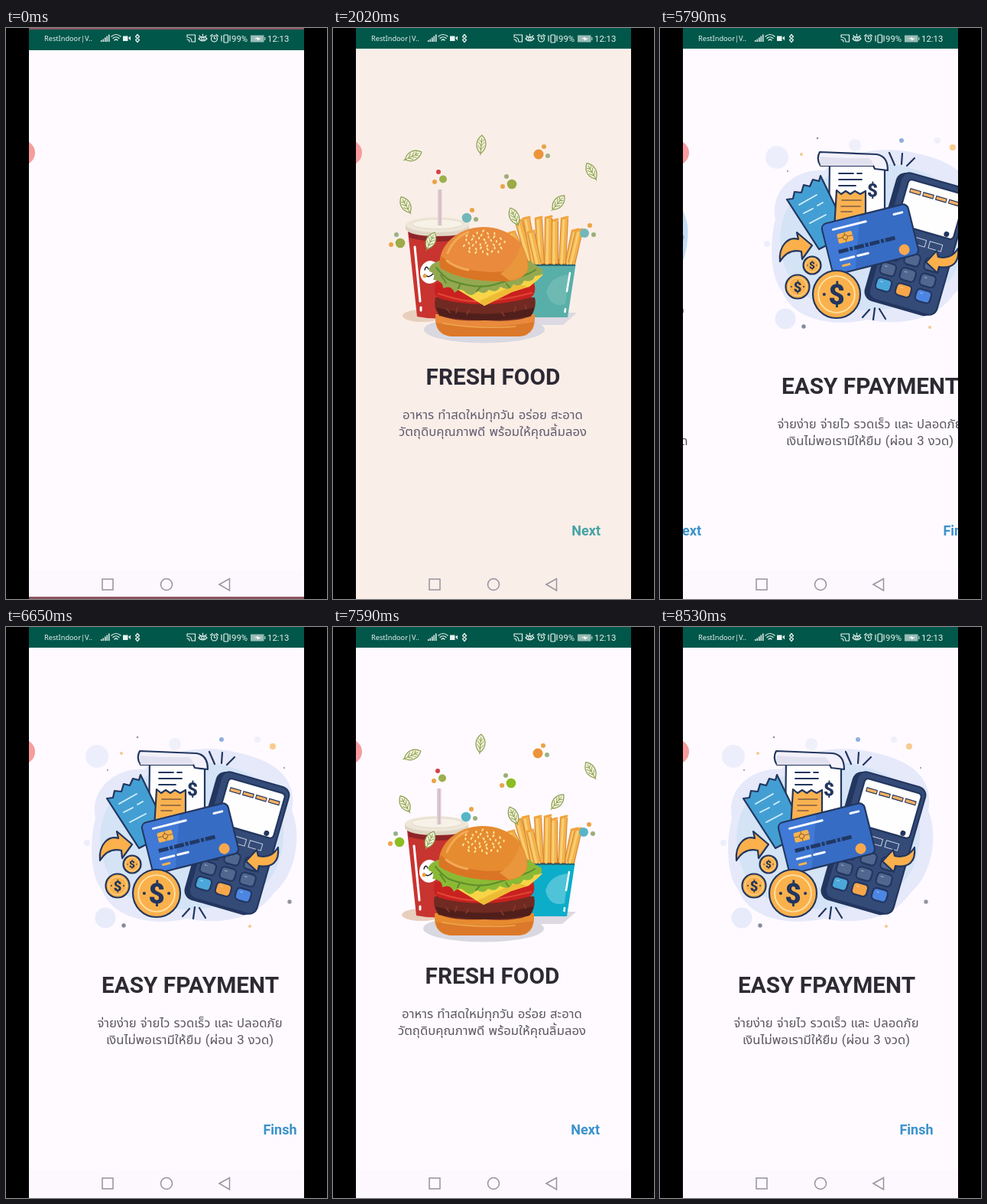
Animation, 420 px wide and 746 px high, one loop 8.61 s. Source, as an HTML page:

```html
<!DOCTYPE html>
<html lang="th">
<head>
<meta charset="utf-8">
<title>Onboarding</title>
<style>
html, body { margin: 0; width: 100%; height: 100%; overflow: hidden; background: #000; }
svg { display: block; width: 420px; height: 746px; }
#stage {
  --bg: #fefaff; --nav: #fcf8fd; --next: #3a92cc; --title: #2d2a32; --copy: #5a575e;
  --cup: #0cadc9; --cupLight: #4fc4d8; --lime: #8cbd22; --sky: #c5ddf5; --city: #e8f1fc;
  --virus: #5b82d8; --jeans: #3f70cc; --jeansDark: #2c559f; --body: #fab52e; --pale: #fdd165;
  --box: #f7a51f; --bun: #e68b2f; --shirt: #84ba8c; --lettuce: #8aba35; --dot: #57b5c8;
}
#stage.warm {
  --bg: #faeee8; --nav: #faeee8; --next: #45a3a4; --title: #2c2935; --copy: #605c70;
  --cup: #58afa9; --cupLight: #6ebab3; --lime: #9caa47; --sky: #c9e5e2; --city: #e5edf0;
  --virus: #4a8387; --jeans: #3c7275; --jeansDark: #2b565c; --body: #f3b34b; --pale: #f6ca74;
  --box: #eea344; --bun: #e98a3c; --shirt: #74aa93; --lettuce: #93a850; --dot: #72b7bb;
}
text { font-family: Roboto, "Noto Sans Thai Looped", "Noto Sans", "Noto Sans Thai", sans-serif; }
.title { font-size: 29.8px; font-weight: 700; fill: var(--title); text-anchor: middle; }
.copy { font-size: 16.7px; word-spacing: 1px; fill: var(--copy); text-anchor: middle; }
.next { font-size: 18px; font-weight: 700; fill: var(--next); text-anchor: end; }
.status { fill: #e9f3f0; font-size: 11.4px; }
.carrier { font: 9.2px "Noto Sans", sans-serif; }
.line { fill: none; stroke-linecap: round; stroke-linejoin: round; }
.ink { stroke: #22365f; stroke-width: 2.2; stroke-linejoin: round; }
.cash { fill: #22365f; font-weight: 900; text-anchor: middle; }
</style>
</head>
<body>
<svg id="stage" viewBox="0 0 420 746">
<defs>
  <clipPath id="screen"><rect x="30" width="360" height="746"/></clipPath>
  <g id="leaf" class="line" stroke="#8b9d4c" stroke-width="1.2">
    <path d="M0-12C8-5 8 5 0 12C-8 5-8-5 0-12Z" fill="#f1f2dc"/>
    <path d="M0-8V14M0 7L4 2M0 7L-4 2M0 2L4-3M0 2L-4-3M0-3L3-6M0-3L-3-6" stroke-width=".9"/>
  </g>
  <g id="virus" fill="none" stroke="var(--virus)">
    <circle r="5" fill="var(--virus)"/>
    <circle r="7.5" stroke-width="4" stroke-dasharray="1.5 4.39"/>
    <circle r="9" stroke-width="1.8" stroke-dasharray="3 4.07" stroke-dashoffset=".8"/>
  </g>
</defs>

<rect width="420" height="746"/>
<g clip-path="url(#screen)">
<rect x="30" width="360" height="746" fill="var(--bg)"/>
<g id="pages">

<g id="food"><g transform="translate(1)">
  <ellipse cx="116" cy="376" rx="26" ry="8" fill="#e8cfbd"/>
  <path d="M262 372H318L300 388H262Z" fill="#dcd9e2"/>
  <ellipse cx="197" cy="394" rx="79" ry="17.500" fill="#d9d8e1"/>
  <path d="M97 266H175L162 377Q136 382 109 377Z" fill="#c83430"/>
  <path d="M152 268H175L162 377Q156 379 148 379Z" fill="#a4272b"/>
  <path d="M98 267H175L174 274Q136 284 99 274Z" fill="#8f2428"/>
  <path class="line" d="M106 286L113 357M114 365V369" stroke="#fff" stroke-width="3"/>
  <path d="M94 257V263Q100 272 136 272T177 263V257Z" fill="#dfd5c4"/>
  <ellipse cx="135.500" cy="257" rx="41.500" ry="10" fill="#eee7d9"/>
  <ellipse cx="136" cy="256" rx="33" ry="6.500" fill="#f7f2e8" stroke="#e2d8c8"/>
  <rect x="136" y="211" width="5.500" height="47" fill="#dfcdd4"/>
  <path d="M139 211V258" stroke="#cbaab3"/>
  <ellipse cx="126" cy="319" rx="13" ry="15" fill="#fff" transform="rotate(8 126 319)"/>
  <path class="line" d="M119 316Q121 309 124 315M126 314Q129 309 130 315M119 322Q124 328 130 321" stroke="#222" stroke-width="1.500"/>
  <circle cx="119" cy="324" r="2.500" fill="#efa13c"/>

  <path d="M243 302H316V312H243Z" fill="#8a4a24"/>
  <g id="fries" class="line"></g>
  <path d="M252 309H316.500L306 378H256Z" fill="var(--cup)"/>
  <path d="M278 344Q284 324 308 322L303 361Q283 366 278 344Z" fill="var(--cupLight)"/>
  <path d="M252 310H316" stroke="#2b6870" stroke-width="2"/>
  <path class="line" d="M309 320L305 344M303 367L302.500 371" stroke="#fff" stroke-width="2.500"/>
  <g id="leaves"></g>
  <g id="foodDots"></g>

  <path d="M133 374H263V382Q262 403 240 403H156Q134 402 133 382Z" fill="var(--bun)"/>
  <path d="M134 385Q198 396 262 384Q260 402 240 403H156Q137 402 134 385Z" fill="#dc7829"/>
  <path class="line" d="M143 386Q190 394 238 390" stroke="#efa850" stroke-width="1.500"/>
  <path d="M133 352H263Q266 365 258 376Q240 385 198 382Q152 384 137 374Q130 365 133 352Z" fill="#702a22"/>
  <path d="M134 365Q198 382 262 365Q262 372 257 377Q198 387 138 376Z" fill="#501f1b"/>
  <path class="line" d="M148 367L152 372M162 365L160 372M177 369L174 374M220 371L223 376M238 364L236 371M250 362L252 367" stroke="#8c3b2d" stroke-width="1.500"/>
  <path d="M134 333H262Q266 346 258 352Q198 369 140 354Q128 349 134 333Z" fill="#c9211f"/>
  <path class="line" d="M137 347Q170 359 198 357T259 346" stroke="#e04636" stroke-width="2"/>
  <path d="M154 337L197 363L233 345L256 338L267 329L274 322L242 315Z" fill="#f8d548"/>
  <path d="M190 357L197 363L233 345L254 338L240 334Z" fill="#eebb35"/>
  <path d="M138 304Q123 309 125 318Q134 320 130 329Q143 330 143 340Q154 335 158 346Q166 338 173 346Q181 353 188 343Q196 350 203 342Q213 347 218 338Q230 345 235 335Q245 339 249 330Q261 333 263 324Q277 324 272 314Q264 311 257 304Z" fill="var(--lettuce)"/>
  <path class="line" d="M134 313Q145 326 151 329T176 336T211 335T241 326T264 316M140 323L147 333M166 334L163 340M193 337L187 344M226 334L230 339" stroke="#5f8c2c" stroke-width="2"/>
  <path d="M139 313C135 285 161 261 194 260C230 259 257 284 254 316Q247 331 222 331Q166 331 139 313Z" fill="var(--bun)"/>
  <path d="M254 301Q257 331 222 331Q166 331 139 313Q137 306 141 298Q160 317 205 319Q240 319 254 301Z" fill="#d97524"/>
  <path d="M218 321Q237 309 244 285Q257 299 253 316Q248 328 230 330Z" fill="#ea963c"/>
  <path class="line" d="M149 294Q158 273 176 267M148 304Q159 313 176 316" stroke="#f2a954" stroke-width="3"/>
  <g id="seeds" class="line" stroke="#ffe5a1" stroke-width="2"></g>
  <text class="title" x="208.500" y="466">FRESH FOOD</text>
  <text class="copy" x="208" y="511">อาหาร ทำสดใหม่ทุกวัน อร่อย สะอาด</text>
  <text class="copy" x="208" y="533">วัตถุดิบคุณภาพดี พร้อมให้คุณลิ้มลอง</text>
  <text class="next" x="349" y="663">Next</text>
</g></g>

<g id="ride"><g transform="translate(-3.5)">
  <path d="M112 332C78 285 81 189 153 180C184 179 197 192 207 211C218 217 233 213 245 209C288 195 337 220 336 268C335 304 321 325 309 345H125Z" fill="var(--sky)"/>
  <path d="M109 366V209H115V202H128V209H133V258H145V366Z" fill="var(--city)"/>
  <path d="M145 366V315H250V191H256V183H272V191H279V287H287V262H294V249H309V262H320V366Z" fill="var(--city)"/>
  <path d="M113 222H129M113 232H129M113 242H129M113 252H129M113 262H129M113 272H129" stroke="var(--sky)" stroke-width="1.500"/>
  <path d="M260 194V285M269 194V285M294 272H313M294 284H313M294 296H313" stroke="var(--sky)" stroke-width="3" stroke-dasharray="4 4"/>
  <path d="M154 230Q156 221 165 221Q168 208 181 210Q191 210 193 220Q204 219 207 230Z" fill="#fffdff"/>
  <path d="M278 245Q280 236 290 238Q293 228 304 232Q313 231 315 238Q327 236 328 245Z" fill="#fffdff"/>
  <g id="viruses"></g>
  <path class="line" d="M102 317H126M113 322H127M101 334H127" stroke="#52748c" stroke-width="1.300"/>
  <path d="M112 367Q94 359 93 348Q106 351 112 367Q98 348 102 337Q113 346 113 364Q106 343 112 332Q120 345 114 365Q116 345 125 339Q127 355 115 367Q121 351 130 350Q129 361 115 367Z" fill="#236966"/>
  <circle cx="166" cy="337" r="30" fill="#20272d"/><circle cx="166" cy="337" r="16" fill="#8d989d"/>
  <rect x="103" y="367" width="227" height="5" fill="#20262a"/>
  <rect x="133" y="232" width="52" height="55" fill="var(--box)"/>
  <path d="M174 232H185V287H174Z" fill="#e7922b"/>
  <path d="M133 232H185V251H133Z" fill="var(--box)"/><path d="M133 251H185" stroke="#dd8425"/>
  <path d="M147 235V243M164 235V243M176 234V243" stroke="#4b243b" stroke-width="3"/>
  <path d="M145 257H172V276H145Z" fill="var(--pale)" stroke="#dd8425"/>
  <path d="M145 258L158 268L172 258" fill="#f4a53a" stroke="#dd8425"/><circle cx="158" cy="262" r="2" fill="#402335"/>

  <path d="M130 342Q128 309 151 297H214Q217 312 207 334L250 335L249 270L260 266Q276 293 286 306Q309 304 317 321L301 317Q279 313 261 342Z" fill="var(--body)"/>
  <path d="M133 335Q133 307 153 300H184Q200 308 193 332Z" fill="var(--pale)"/>
  <path d="M250 274L260 266Q270 288 283 306Q258 317 253 337H244Q252 310 250 274Z" fill="#ffc957"/>
  <path class="line" d="M151 324H178M151 330H178" stroke="#e99a2f" stroke-width="1.800"/>
  <path d="M145 298Q145 287 157 287H207Q219 289 213 298Z" fill="#3d2439"/>
  <path d="M130 342H258Q261 321 279 310" fill="none" stroke="#e8962b" stroke-width="2"/>
  <circle cx="286" cy="337" r="30.500" fill="#20272d"/><circle cx="286" cy="337" r="17.500" fill="#f6f7f7"/>
  <path d="M257 326Q267 302 295 304Q315 308 317 324Q295 307 257 326Z" fill="var(--body)"/>
  <circle cx="286" cy="337" r="8" fill="#416b76"/><circle cx="286" cy="337" r="3.500" fill="#fff"/>

  <path d="M193 274H217Q240 278 238 294L236 329H225L222 299L200 295Q191 291 193 274Z" fill="var(--jeans)"/>
  <path class="line" d="M205 283Q230 283 230 298V326" stroke="var(--jeansDark)" stroke-width="1.500" stroke-dasharray="3 2"/>
  <path d="M224 328H236L243 333V335H225Z" fill="#222a35"/>
  <path d="M208 228Q195 239 192 258L191 278Q205 285 218 276L217 254L220 234Z" fill="var(--shirt)"/>
  <path class="line" d="M212 240Q214 261 228 264L247 267" stroke="var(--shirt)" stroke-width="9"/>
  <path class="line" d="M207 248Q209 265 226 269L239 270" stroke="#56936f" stroke-width="1.300"/>
  <circle cx="249" cy="267" r="4" fill="#f2b58b"/>
  <path d="M207 219H218L216 233Q210 238 206 230Z" fill="#e79e7a"/>
  <path d="M209 205H236L237 222Q234 234 225 233Q213 231 210 217Z" fill="#f7c5a0"/>
  <path d="M203 208Q201 201 205 197H220L218 211L213 218H206Z" fill="#28252e"/>
  <circle cx="210" cy="215" r="4" fill="#eea681"/>
  <path d="M214 217L235 217Q238 231 225 233Q217 230 214 217Z" fill="#7db796"/>
  <path d="M213 219L232 223M219 226H232" stroke="#b4d5be"/>
  <path d="M224 211H229M226 214V216" stroke="#2b2730" stroke-width="1.500"/>
  <path d="M202 206Q202 187 220 187Q235 189 235 195L242 197Q243 203 235 202Q219 201 202 206Z" fill="#f6ac2e"/>
  <path d="M203 203Q217 194 235 195" fill="none" stroke="#d8801f" stroke-width="1.500"/>
  <path d="M255 260L270 254L274 268L258 273Z" fill="#ee9b2c"/>
  <path class="line" d="M246 264L255 268" stroke="#302333" stroke-width="4"/>
  <circle cx="251" cy="268" r="3.500" fill="#7b2946"/>
  <text class="title" x="213.500" y="478">FAST DELIVERY</text>
  <text class="copy" x="213" y="523">อยากกินต้องได้กิน ส่งอาหารเร็ว ส่ง</text>
  <text class="copy" x="213" y="545">อาหารแรง ส่งอาหารไว นึกว่าคนขับติด</text>
  <text class="copy" x="213" y="567">จรวจ</text>
  <text class="next" x="353.500" y="663">Next</text>
</g></g>

<g id="pay"><g transform="translate(-7)">
  <g id="payDots"></g>
  <path d="M94 250C86 211 122 183 158 186C190 157 247 155 279 164C330 174 359 199 351 240C365 274 355 325 328 347C305 381 259 390 214 381C166 392 115 379 103 344C87 326 86 280 94 250Z" fill="#e5e9fa"/>
  <path d="M103 254C113 211 150 204 180 184C234 164 306 187 326 217C350 253 341 311 317 335C273 374 193 378 139 353C109 338 94 290 103 254Z" fill="#d4e3f6"/>
  <path class="line ink" d="M243 163L250 179M260 164L259 178M276 170L266 180M208 378L217 368M222 381L224 366M238 380L230 367" stroke-width="1.600"/>
  <path class="ink" d="M165 174H237V280L164 258Z" fill="#fffeff"/>
  <path class="ink" d="M152 162L226 165Q241 167 241 186L224 184L222 180H153Q147 171 152 162Z" fill="#f4f1fa"/>
  <path d="M152 168Q189 171 216 170Q222 174 222 180H153Z" fill="#e2e1ef"/>
  <path class="line" d="M177 190H196M201 190H207M177 198H207M177 206H199" stroke="#22365f" stroke-width="1.800"/>
  <text class="cash" x="221" y="220" font-size="24">$</text>
  <path class="ink" d="M109 224L117 223L119 214L128 215L131 205L139 207L143 198L151 200L153 193L190 269L151 289Z" fill="#439fd3"/>
  <path class="line" d="M125 231L148 218M131 242L143 236M149 232L156 228M139 255L160 244" stroke="#d5effb" stroke-width="1.800"/>
  <path class="ink" d="M174 212L180 217L186 213L192 217L198 213L205 217L212 213V263H171Z" fill="#fab250"/>
  <path class="line" d="M181 225H206M180 233H205M180 240H194" stroke="#7c5b45" stroke-width="1.600"/>

  <g transform="translate(282 282) rotate(16)">
    <rect class="ink" x="-51" y="-84" width="92" height="172" rx="12" fill="#22365f"/>
    <rect class="ink" x="-46" y="-86" width="92" height="172" rx="11" fill="#344a77"/>
    <rect class="ink" x="-36" y="-78" width="77" height="61" rx="5" fill="#fffeff"/>
    <path d="M-31-64H37" stroke="#22365f" stroke-width="6" stroke-dasharray="15 2.600"/>
    <path d="M-30-64H36" stroke="#f7b062" stroke-width="3.500" stroke-dasharray="13 4.600"/>
    <circle cx="31" cy="-22" r="3.500" fill="#22365f"/>
    <path d="M-31-7H-14V2H-31ZM-9-7H8V2H-9ZM13-7H30V2H13Z" fill="none" stroke="#c8d4e6"/>
    <g id="keys"></g>
  </g>
  <g transform="translate(218 276) rotate(-14)">
    <rect class="ink" x="-58" y="-34" width="116" height="68" rx="7" fill="#376cc4"/>
    <path d="M-51-33H-6L-28 33H-51Q-57 33-57 27V-27Q-57-33-51-33Z" fill="#4079d6"/>
    <path class="line" d="M-44-24H0M38-24H49M-44 17H-26M-21 17H-7" stroke="#f8faff" stroke-width="3"/>
    <path d="M-44 6H32" stroke="#203864" stroke-width="5" stroke-dasharray="13 2 4 2"/>
    <rect x="-41" y="-17" width="20" height="13" rx="2" fill="#f8b24f"/>
    <path d="M-41-11H-21M-31-17V-4" stroke="#8c6537"/><circle cx="-31" cy="-10.500" r="3" fill="#f8b24f" stroke="#8c6537"/>
    <path d="M-44 25H-33" stroke="#f8b24f" stroke-width="3"/>
    <circle cx="40" cy="24" r="7" fill="#f8a94d"/>
  </g>
  <g id="coins"></g>
  <path class="ink" d="M100 305C98 284 111 272 124 276L122 267L142 284L129 302L128 292C116 289 107 294 100 305Z" fill="#fbb04c"/>
  <path class="ink" d="M333 288C335 307 325 315 308 312L306 320L291 306L305 291L307 299C319 302 327 298 333 288Z" fill="#fbb04c"/>
  <text class="title" x="218" y="478">EASY FPAYMENT</text>
  <text class="copy" x="217.500" y="523">จ่ายง่าย จ่ายไว รวดเร็ว และ ปลอดภัย</text>
  <text class="copy" x="217.500" y="545">เงินไม่พอเรามีให้ยืม (ผ่อน 3 งวด)</text>
  <text class="next" x="357.500" y="663">Finsh</text>
</g></g>
</g>

<rect x="30" y="709" width="360" height="37" fill="var(--nav)"/>
<g fill="none" stroke="#96929f" stroke-width="1.500">
  <rect x="126" y="720" width="14" height="14"/><circle cx="210" cy="727" r="7.500"/><path d="M279 727L292.500 719.500V735Z"/>
</g>
<rect x="30" width="360" height="27" fill="#00574a"/>
<g id="opening">
  <path d="M30 26H390V29H30Z" fill="#00574a"/>
  <path d="M30 0H390V2H30ZM30 743H390V746H30Z" fill="#8c5560"/>
</g>
<g class="status">
  <text class="carrier" x="50" y="17">RestIndoor|V..</text>
  <path d="M124 16h1.500v2h-1.500zM126.500 14.500h1.500v3.500h-1.500zM129 12.500h1.500v5.500h-1.500zM131.500 10.500h1.500v7.500h-1.500zM134 8.500h1.500v9.500h-1.500zM153 10.500h6.500v6.500h-6.500zM160 13l3-2.500v6z"/>
  <g class="line" stroke="#e9f3f0" stroke-width="1.200">
    <path d="M138 11Q144 6 150 11M140 13.500Q144 10 148 13.500M142 16Q144 14 146 16M172 8.500L174.500 11.500L169.500 15.500L172 18.500L174.500 15.500L169.500 11.500Z"/>
    <path d="M237 12V9H247.500V18H244M237 15Q240 15 240 18M237 12Q243 12 243 18M252 14Q257.500 8 263 14Q257.500 20 252 14M253 10L254 11M257.500 8V9.500M262 10L261 11"/>
    <circle cx="257.500" cy="14" r="1.800"/><circle cx="272.500" cy="14" r="4"/>
    <path d="M272.500 11.500V14H274.500M267.500 10.500L270 8.500M277.500 10.500L275 8.500M282 10V17M293 10V17"/>
    <rect x="285" y="9" width="5.500" height="10" rx="1"/>
  </g>
  <path d="M320 9.500h17.500v9h-17.500zM338 12h1.500v4h-1.500z" opacity=".65"/><path d="M325 14L330 12V13.500H334L329 16.500V14.500Z" fill="#fff"/>
  <text x="295" y="18">99%</text><text x="342" y="18">12:13</text>
</g>
<circle cx="22" cy="163" r="16" fill="#f69c9f"/>
</g>
</svg>
<script>
const $ = id => document.getElementById(id);
const fill = (id, items, draw) => { $(id).innerHTML = items.map(draw).join(''); };
const dot = ([x, y, r, c]) => `<circle cx="${x}" cy="${y}" r="${r}" fill="${c}"/>`;
const lime = 'var(--lime)', teal = 'var(--dot)', amber = '#eba344';

fill('fries', [[233, 268, 252], [242, 253, 257], [252, 249, 263], [316, 265, 307], [302, 249, 299],
  [289, 252, 289], [268, 249, 271], [281, 248, 280], [321, 265, 311], [258, 267, 267]], ([x, y, b]) =>
  `<path d="M${x} ${y}L${b} 308" stroke="#d78232" stroke-width="10" stroke-linecap="butt"/>
   <path d="M${x} ${y}L${b} 308" stroke="#f3b34c" stroke-width="8" stroke-linecap="butt"/>
   <path d="M${x - 1} ${y + 2}L${b - 1} 308" stroke="#f9cf73" stroke-width="3"/>
   <path d="M${x - 4} ${y}L${x + 4} ${y - 2}" stroke="#f0a53f" stroke-width="3"/>`);
fill('leaves', [[193, 152, 5], [104, 167, 65], [337, 187, -30], [94, 231, -30], [294, 228, 40], [236, 246, -25], [127, 278, 25]],
  ([x, y, a]) => `<use href="#leaf" transform="translate(${x} ${y}) rotate(${a})"/>`);
fill('foodDots', [[268, 165, 6.5, '#ec943a'], [275, 155, 3, amber], [280, 167, 3, '#9cb488'],
  [137, 188, 3, '#d44245'], [143, 197.5, 5, '#9eaf4c'], [132, 201, 3, amber],
  [226, 194, 3, '#9cae79'], [233, 204, 6.3, lime], [221, 207, 3, amber],
  [174, 248, 6.3, teal], [181, 238, 3, amber], [186, 250, 3, '#9cae79'],
  [87, 281, 6.3, lime], [82, 270, 3, '#96b28c'], [75, 283, 3, amber],
  [328, 268, 6, teal], [335, 258, 3, amber], [340, 270, 3, '#9cae79']], dot);
fill('seeds', [...Array(38).keys()], i => {
  const r = Math.sqrt((i + .5) / 38), a = i * 2.4;
  const x = 196 + 29 * r * Math.cos(a), y = 280 + 16 * r * Math.sin(a);
  return `<path d="M${x} ${y}l${i % 3 - 1} 1.500"/>`;
});
fill('viruses', [[145, 202, .85], [189, 206, .42], [238, 242, .9], [261, 202, .45], [302, 227, .65],
  [327, 274, .45], [165, 223, .6], [115, 295, .85]],
  ([x, y, s]) => `<use href="#virus" transform="translate(${x} ${y}) scale(${s})"/>`);
fill('payDots', [[96, 169, 15, '#eceefb'], [107, 380, 13.5, '#e8ebfa'], [198, 153, 8, '#f0f0fb'], [83, 282, 4, '#eceefb'],
  [306, 147, 4, '#efeffb'], [259, 147, 3, '#91afdf'], [326, 156, 4, '#f8cb8f'], [128, 165, 2, '#f5c88f'],
  [149, 144, 1.3, '#8e92a4'], [131, 390, 2.7, '#85899a'], [348, 359, 2.7, '#91939f'], [296, 391, 2, '#f5c88f'],
  [341, 184, 1, '#85899a'], [353, 262, 1.3, '#f5c88f'], [110, 187, 1, '#85899a']], dot);
fill('keys', [...Array(9).keys()], i => {
  const x = i % 3 * 27 - 40, y = (i / 3 | 0) * 21 + 14;
  const c = i < 6 ? '#52678f' : ['#4ba7da', '#f7a64a', '#4c86e2'][i - 6];
  return `<rect class="ink" x="${x}" y="${y}" width="20" height="16" rx="5" fill="${c}"/>
    <path class="line" d="M${x + 5} ${y + 5}h3" stroke="#fff" opacity=".5"/>`;
});
fill('coins', [[174, 348, 31], [123, 338, 15.5], [142, 310, 11.5]], ([x, y, r]) =>
  `<circle class="ink" cx="${x}" cy="${y}" r="${r}" fill="#fab14c"/>
   <circle cx="${x}" cy="${y}" r="${r * .77}" fill="none" stroke="#ffe1a6" stroke-width="${r / 16}"/>
   <text class="cash" x="${x}" y="${y + r * .42}" font-size="${r * 1.18}">$</text>
   ${[-1, 1].map(s => dot([x + s * r * .52, y, r / 15, '#22365f'])).join('')}`);

// Time in ms and scroll position in px; each holds until the next.
const LOOP = 8610;
const scrolls = [[0, 0], [4940, 353], [5020, 357], [5160, 360],
  [5790, 656], [5870, 700], [5950, 714], [6060, 720],
  [6650, 690], [6730, 560], [6810, 420], [6890, 368], [6970, 356.5],
  [7110, 290], [7190, 150], [7270, 50], [7350, 15], [7430, 4], [7590, 1],
  [7780, 30], [7860, 130], [7940, 260], [8020, 325], [8100, 350], [8180, 365],
  [8260, 430], [8340, 560], [8430, 680], [8530, 713]];
const fades = [[0, 0], [220, .25], [300, .55], [380, .85], [460, 1]];
const at = (steps, t) => steps.findLast(s => s[0] <= t)[1];
const pages = ['food', 'ride', 'pay'].map($);
const start = performance.now();

function frame() {
  const t = (performance.now() - start) % LOOP;
  const pos = at(scrolls, t);
  pages.forEach((page, i) => {
    const x = i * 360 - pos;
    page.setAttribute('transform', `translate(${x})`);
    page.style.display = Math.abs(x) < 360 ? '' : 'none';
  });
  $('pages').style.opacity = at(fades, t);
  $('stage').classList.toggle('warm', t >= 650 && t < 5020);
  $('opening').style.display = t < 80 ? '' : 'none';
  requestAnimationFrame(frame);
}
frame();
</script>
</body>
</html>
```
